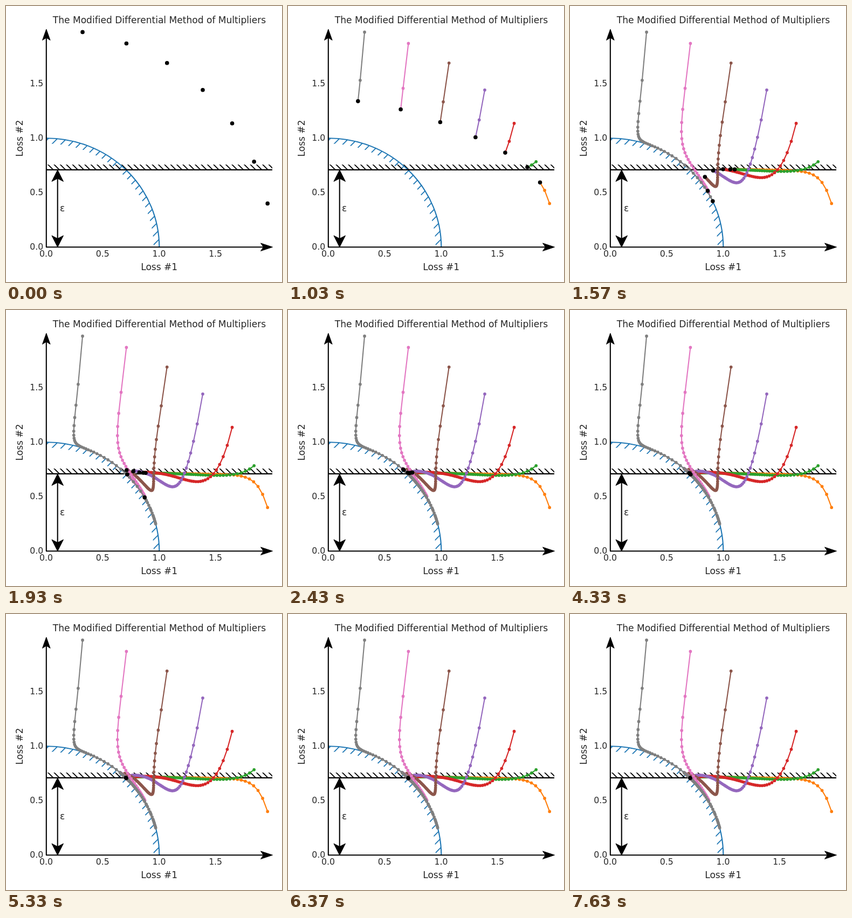
Write an HTML page with a canvas that moves like this. It is 512 by 512 pixels and loops after 7660 ms.

```html
<!DOCTYPE html>
<html lang="en">
<head>
<meta charset="utf-8">
<title>Modified Differential Method of Multipliers</title>
<style>
  html, body { margin: 0; width: 100%; height: 100%; overflow: hidden; background: #fff; }
  svg, canvas { position: absolute; left: 0; top: 0; width: 100vw; height: 100vh; display: block; }
  text { font-family: "DejaVu Sans", sans-serif; fill: #262626; font-variant-ligatures: none; }
  .big { font-size: 17.07px; text-anchor: middle; }
  .tick { font-size: 15.64px; }
  .axis { stroke: #000; stroke-width: 2.1; fill: none; }
  .blue { stroke: #1f77b4; fill: none; }
  .hatch { stroke-width: 1.8; fill: none; }
  #heads { stroke: #000; stroke-width: 0.9; }
</style>
</head>
<body>
<svg viewBox="0 0 512 512">
  <defs>
    <clipPath id="ring"><path id="ringShape"/></clipPath>
    <clipPath id="band"><rect x="74.8" y="294.2" width="419.2" height="10"/></clipPath>
  </defs>
  <path id="ringHatch" class="blue hatch" clip-path="url(#ring)"/>
  <path id="bandHatch" class="hatch" stroke="#000" clip-path="url(#band)"/>
  <path id="front" class="blue" stroke-width="2.1"/>
  <path class="axis" d="M74.5 303.9H494"/>
  <path class="axis" d="M74.8 447V52M74 447.2H484M95.7 315V437"/>
  <g id="heads"></g>
  <text class="big" x="284.5" y="32">The Modified Differential Method of Multipliers</text>
  <text class="big" x="284.2" y="490">Loss #1</text>
  <text class="big" transform="translate(31 245.5) rotate(-90)">Loss #2</text>
  <text x="100" y="381" font-size="17.07">ε</text>
  <g id="ticks"></g>
</svg>
<canvas id="view"></canvas>
<script>
const LOOP = 7660, FPS = 30, START = 30, STEPS = 400;
const X0 = 74.9, Y0 = 447.2, SX = 209.4, SY = 202;
const TILE = 102.4;
const EPS = Math.SQRT1_2;
const COLORS = ['#ff7f0e', '#2ca02c', '#d62728', '#9467bd', '#8c564b', '#e377c2', '#7f7f7f'];
const $ = id => document.getElementById(id);
const px = x => X0 + x * SX;
const py = y => Y0 - y * SY;

// Static chart
const arc = (r, from, to, sweep) =>
  `${px(from[0] * r)} ${py(from[1] * r)}A${SX * r} ${SY * r} 0 0 ${sweep} ${px(to[0] * r)} ${py(to[1] * r)}`;
const TOP = [0, 1], RIGHT = [1, 0];
$('front').setAttribute('d', 'M' + arc(1, TOP, RIGHT, 1));
$('ringShape').setAttribute('d', `M${arc(1, TOP, RIGHT, 1)}L${arc(0.95, RIGHT, TOP, 0)}Z`);

let rising = '', falling = '';
for (let sum = 0; sum < 800; sum += TILE / 6) rising += `M${sum - 230} 230L${sum - 460} 460`;
for (let x = 290 - 5 * TILE; x < 500; x += TILE / 9) falling += `M${x} 290l20 20`;
$('ringHatch').setAttribute('d', rising);
$('bandHatch').setAttribute('d', falling);

const head = (x, y, turn, w, len, notch) =>
  `<path transform="translate(${x} ${y}) rotate(${turn})" d="M0 0L${w} ${len}L0 ${notch}L${-w} ${len}Z"/>`;
$('heads').innerHTML =
  head(74.8, 43, 0, 7.3, 20.5, 16) + head(494.5, 447.2, 90, 7.3, 22, 17) +
  head(95.7, 304, 0, 10.8, 21.5, 16) + head(95.7, 447.4, 180, 10.8, 21.5, 16);

const label = (x, y, anchor, v) =>
  `<text class="tick" x="${x}" y="${y}" text-anchor="${anchor}">${v.toFixed(1)}</text>`;
$('ticks').innerHTML = [0, 0.5, 1, 1.5].map(v =>
  label(px(v) - 0.4, 465, 'middle', v) + label(69.2, py(v) + 5.2, 'end', v)).join('');

// Damped multiplier descent: losses are r·cos(a) and r·sin(a), with r = 1 + s²
function descend(a) {
  const rate = 0.01, damping = 10, path = [];
  let s = 1, lambda = 0;
  for (let i = 0; i <= STEPS; i++) {
    const r = 1 + s * s, c = Math.cos(a), n = Math.sin(a);
    path.push([px(r * c), py(r * n)]);
    const gap = r * n - EPS, mu = lambda + damping * gap;
    s -= rate * 2 * s * (c + mu * n);
    a -= rate * r * (mu * c - n);
    lambda = Math.max(0, lambda + gap);
  }
  return path;
}
const tracks = COLORS.map((color, i) => ({ color, path: descend(0.2014 * (i + 1)) }));

const view = $('view'), ctx = view.getContext('2d');

function dot([x, y], r) {
  ctx.moveTo(x + r, y);
  ctx.arc(x, y, r, 0, 2 * Math.PI);
}

function draw(step) {
  const size = Math.round(512 * (window.devicePixelRatio || 1));
  if (view.width !== size) view.width = view.height = size;
  ctx.setTransform(size / 512, 0, 0, size / 512, 0, 0);
  ctx.clearRect(0, 0, 512, 512);
  ctx.lineWidth = 2.1;
  ctx.lineJoin = 'round';
  for (const { color, path } of tracks) {
    const trail = path.slice(0, step + 1);
    ctx.strokeStyle = ctx.fillStyle = color;
    ctx.beginPath();
    trail.forEach(p => ctx.lineTo(p[0], p[1]));
    ctx.stroke();
    ctx.beginPath();
    trail.forEach(p => dot(p, 2.85));
    ctx.fill();
  }
  ctx.fillStyle = '#000';
  ctx.beginPath();
  for (const { path } of tracks) dot(path[step], 3.8);
  ctx.fill();
}

let shown = -1;
function tick() {
  const t = performance.now() % LOOP;
  const frame = Math.floor((t + 5) * FPS / 1000);
  const step = Math.min(STEPS, Math.max(0, 2 * (frame - START)));
  if (step !== shown) draw(shown = step);
  requestAnimationFrame(tick);
}
tick();
</script>
</body>
</html>
```
